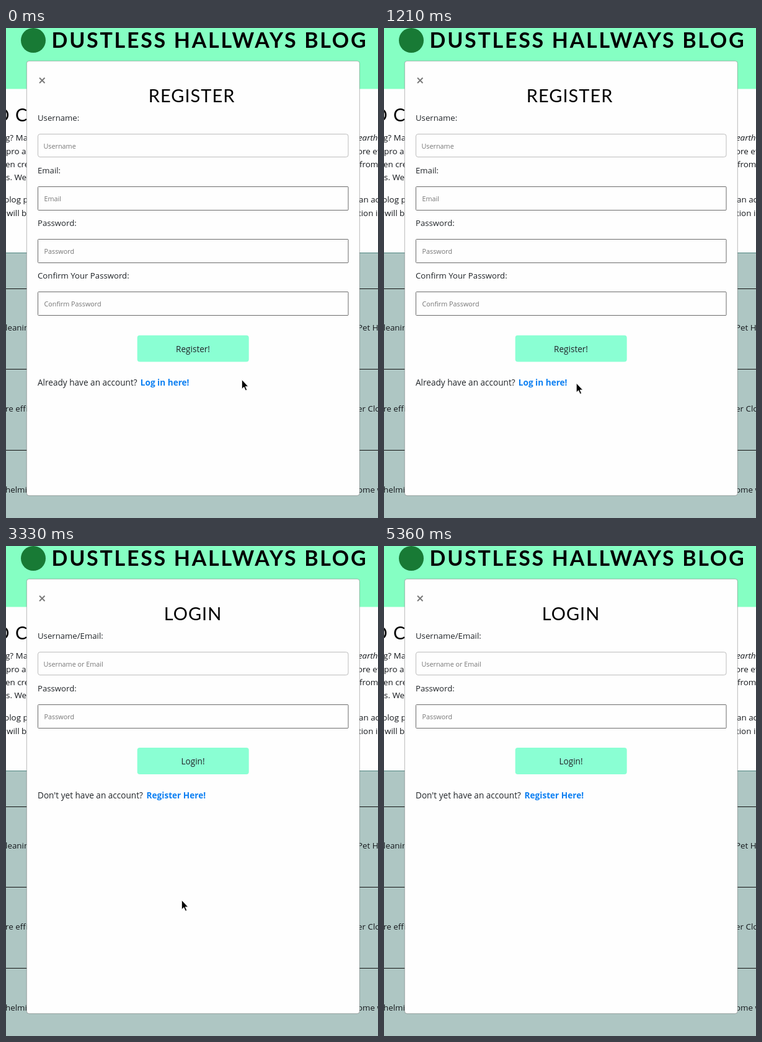
These frames come from a looping animation (600x792 px, 5.39 s). An HTML page:

```html
<!DOCTYPE html>
<html lang="en">
<head>
<meta charset="utf-8">
<title>Register and login dialog</title>
<style>
html, body { margin: 0; width: 100%; height: 100%; overflow: hidden; background: #fefefe; }
svg { display: block; width: 600px; height: 792px; }
text { font: 13.4px "Open Sans", "Noto Sans", sans-serif; fill: #212529; white-space: pre; }
.page { fill: #15181c; }
.label { font-size: 13.2px; }
.hint { font-size: 10.8px; fill: #757575; }
.button, .note { font-size: 13.6px; }
.button { text-anchor: middle; }
.link { font-size: 13.6px; font-weight: 700; fill: #0c7ff2; }
.link.hover { fill: #0056b3; text-decoration: underline; }
.italic { font-style: italic; }
.heading, .title { font-family: Lato, "Open Sans", sans-serif; fill: #000; }
.heading { font-size: 29px; letter-spacing: 1px; }
.title { font-size: 34px; font-weight: 700; letter-spacing: 2.7px; }
</style>
</head>
<body>
<svg id="stage" viewBox="0 0 600 792"></svg>
<script>
const LOOP = 5390, FOCUS = 2560, SWITCH = 2760, LEAVE = 5000;
const stage = document.getElementById("stage");

const box = (x, y, w, h, attrs) => `<rect x="${x}" y="${y}" width="${w}" height="${h}" ${attrs}/>`;
const text = (x, y, kind, words, id = "") =>
  `<text x="${x}" y="${y}" class="${kind}" id="${id}">${words}</text>`;

// Page behind the dialog: baseline, left fragment and its x, right fragment and its x.
const fragments = [
  [182, "g? Ma", -1, "earth", 568, "italic"],
  [203.5, "pro a", 0, "ore ef", 567],
  [225, "en cre", -1, "from", 570],
  [246, "s. We", 0, "", 570],
  [282, "blog p", -3, "an ac", 569],
  [303.5, "will b", 1, "tion i", 568],
  [489, "leanin", -1, "Pet H", 567],
  [620, "re effi", -1, "er Clo", 567],
  [750.5, "helmi", -1, "ome w", 567]
];

const page =
  box(0, 0, 600, 792, 'fill="#fefefe"') +
  box(0, 0, 600, 98.5, 'fill="#85ffc3"') +
  '<circle cx="44" cy="20" r="20" fill="#187a35"/>' +
  text(73.6, 32, "title", "DUSTLESS HALLWAYS BLOG") +
  text(-17.7, 151.3, "heading", "O C") +
  box(0, 363, 600, 429, 'fill="#aec6c3"') +
  box(0, 363, 600, 1, 'fill="#4f8580"') +
  [421, 551, 682].map(y => box(0, y, 600, 1, 'fill="#111"')).join("") +
  fragments.map(([y, left, lx, right, rx, kind = ""]) =>
    text(lx, y, "page", left) + text(rx, y, "page " + kind, right)).join("");

const dialog =
  box(33.3, 53.3, 537, 702.5, 'rx="4" fill="#fefefe" stroke="#000" stroke-opacity=".28"') +
  '<path d="M54 80.5l8.5 8.5m0-8.5l-8.5 8.5" stroke="#7b7b7b" stroke-width="2"/>';

function field(label, hint, i) {
  const y = 85.2 * i;
  const look = i ? 'rx="1" stroke="#6b6b6b"' : 'rx="3.5" stroke="#bdbdbd"';
  return text(51, 150 + 85 * i, "label", label + ":") +
    box(51.5, Math.floor(171 + y) + .5, 500.5, i ? 38 : 37, 'fill="#fefefe" ' + look) +
    text(i ? 61.5 : 60.5, 194.7 + y, "hint", hint);
}

function form(id, title, titleX, fields, action, note, link, linkX) {
  const y = 85.3 * fields.length;
  return `<g id="${id}">` + text(titleX, 119.5, "heading", title) +
    fields.map(([label, hint], i) => field(label, hint, i)).join("") +
    box(211.7, 155.5 + y, 180, 42.8, 'rx="4" fill="#8affd3"') +
    text(301.5, 182.6 + y, "button", action) +
    text(51, 237.2 + y, "note", note) +
    text(linkX, 237.2 + y, "link", link, id + "Link") + "</g>";
}

const forms =
  form("register", "REGISTER", 229.8, [
    ["Username", "Username"], ["Email", "Email"],
    ["Password", "Password"], ["Confirm Your Password", "Confirm Password"]
  ], "Register!", "Already have an account?", "Log in here!", 216.8) +
  form("login", "LOGIN", 254.8, [
    ["Username/Email", "Username or Email"], ["Password", "Password"]
  ], "Login!", "Don't yet have an account?", "Register Here!", 226.6);

const cursors =
  box(214, 560.5, 85, 24, 'id="focus" fill="none" stroke="#12695c" stroke-width="2"') +
  '<path id="arrow" d="M0 0V15L3.4 11.8L6 17.5L8.3 16.5L5.8 11H10.3Z" stroke="#fff" stroke-width=".8"/>' +
  '<path id="hand" d="M-1.5 1Q0 -1 1.5 1V6Q3.5 4.7 4.5 6.6Q6.3 5.6 7.2 7.4Q9.5 7 9.5 9.5' +
  'V13L7.5 16V18.5H-1V16.5L-5 10.5Q-5.5 8 -3.5 8.5L-1.5 10.5Z' +
  'M1.5 6V9M4.5 6.6V9M7.2 7.4V9.5" fill="#fff" stroke="#111" stroke-linejoin="round"/>';

stage.innerHTML = page + dialog + forms + cursors;

// Pointer path: time, x, y of the tip.
const path = [
  [0, 380.4, 568.4], [560, 275, 572], [950, 275, 572], [1500, 351.4, 576.4],
  [1800, 351.4, 576.4], [2400, 283.4, 572.4], [3500, 283.4, 572.4], [4150, 283.4, 546.4],
  [4400, 283.4, 546.4], [LEAVE, 604, 480], [LOOP, 604, 480]
];

function pointer(t) {
  const i = path.findIndex(p => p[0] > t);
  const [t0, x0, y0] = path[i - 1], [t1, x1, y1] = path[i];
  const u = (t - t0) / (t1 - t0), k = u * u * (3 - 2 * u);
  return [x0 + (x1 - x0) * k, y0 + (y1 - y0) * k];
}

const part = id => document.getElementById(id);
const show = (id, on) => part(id).setAttribute("visibility", on ? "visible" : "hidden");

function draw(now) {
  const t = now % LOOP, [x, y] = pointer(t);
  const first = t < SWITCH;
  const hover = first && x > 216 && x < 297 && y > 563 && y < 584;
  show("register", first);
  show("login", !first);
  show("focus", first && t >= FOCUS);
  show("hand", hover);
  show("arrow", !hover && t < LEAVE);
  part("registerLink").classList.toggle("hover", hover);
  for (const id of ["arrow", "hand"]) part(id).setAttribute("transform", `translate(${x} ${y})`);
}

const start = performance.now();
function tick() {
  draw(performance.now() - start);
  requestAnimationFrame(tick);
}
tick();
</script>
</body>
</html>
```
